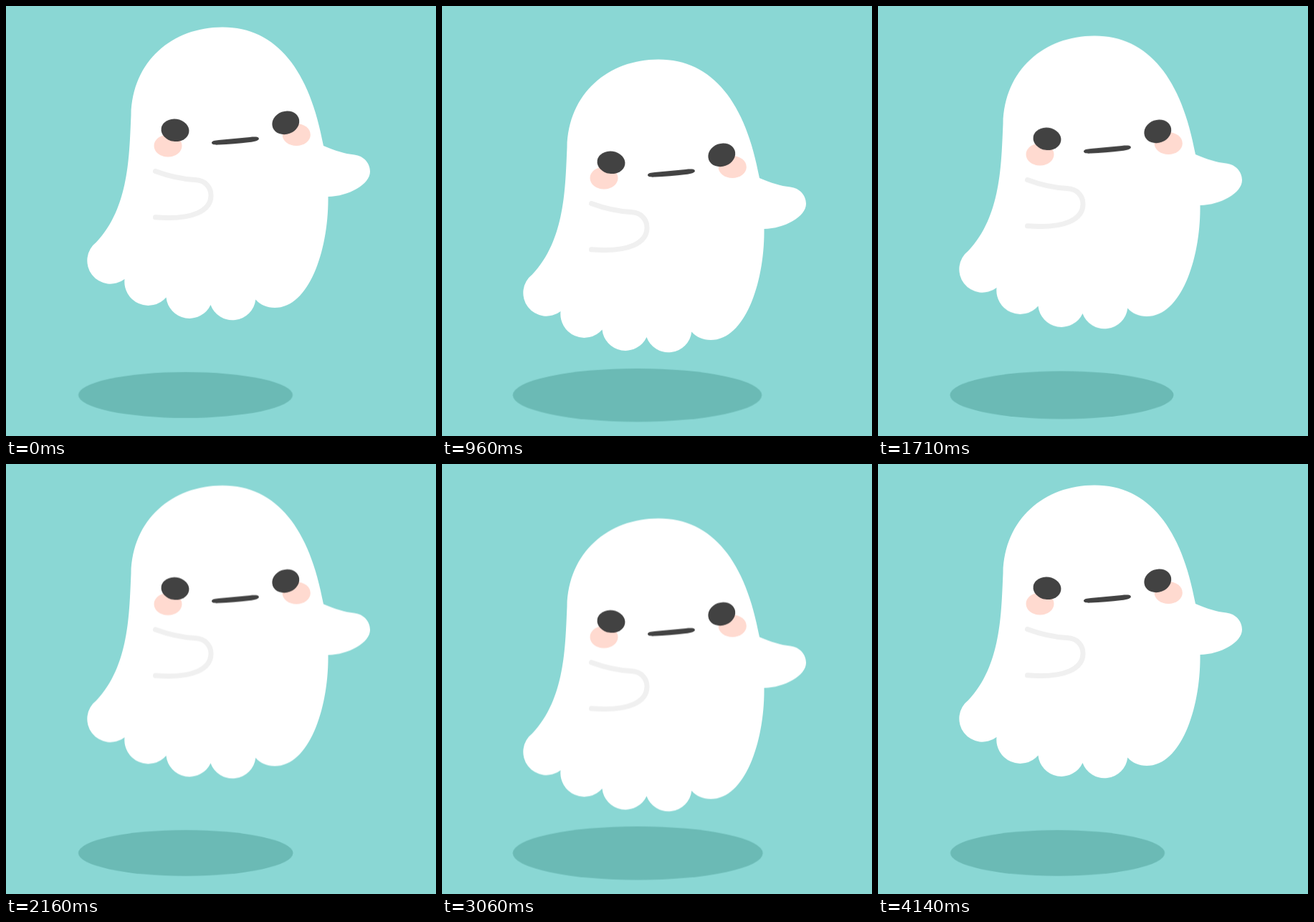
An HTML page without scripts for the animation above (4170 ms loop, 600 by 600 pixels).

```html
<!DOCTYPE html>
<html lang="en">
<head>
<meta charset="utf-8">
<title>Floating ghost</title>
<style>
  html, body { margin: 0; width: 100%; height: 100%; overflow: hidden; background: #8ad7d4; }
  svg { display: block; width: 100%; height: 100%; }

  .ghost, .shadow { animation: 4170ms linear infinite; }
  .ghost { animation-name: bob; }
  .shadow { animation-name: spread; fill: #6bbab5; }

  .body { fill: #fff; }
  .cheek { fill: #ffdad0; }
  .ink { fill: #424242; }
  .arm { fill: none; stroke: #f0f0f0; stroke-width: 7; stroke-linecap: round; }

  @keyframes bob {
    0% { transform: translateY(0); animation-timing-function: cubic-bezier(.43, 0, .62, 1); }
    26.02% { transform: translateY(46.5px); animation-timing-function: cubic-bezier(.5, 0, .5, 1); }
    49.88% { transform: translateY(0); animation-timing-function: cubic-bezier(.47, 0, .5, 1); }
    74.22% { transform: translateY(46.5px); animation-timing-function: cubic-bezier(.46, 0, .46, 1); }
    100% { transform: translateY(0); }
  }
  @keyframes spread {
    0% { transform: translate(250.5px, 542.8px); animation-timing-function: cubic-bezier(.43, 0, .62, 1); }
    26.02% { transform: translate(273.2px, 543px) scale(1.167); animation-timing-function: cubic-bezier(.5, 0, .5, 1); }
    49.88% { transform: translate(250.5px, 542.8px); animation-timing-function: cubic-bezier(.47, 0, .5, 1); }
    74.22% { transform: translate(273.2px, 543px) scale(1.167); animation-timing-function: cubic-bezier(.46, 0, .46, 1); }
    100% { transform: translate(250.5px, 542.8px); }
  }
</style>
</head>
<body>
<svg viewBox="0 0 600 600">
  <ellipse class="shadow" rx="149.5" ry="32"/>
  <g class="ghost">
    <path class="body" d="M302 29.5
      C378 29.5 424 90 443 195
      C460 202 472 206 486 207.5 C499 209 508 219 508 231
      C508 249 478 265.5 449.5 266
      C450.5 340 423 421 375 421 C364 421 355 417 348.3 409.5
      A32.5 32.5 0 0 1 285.5 417
      A32.6 32.6 0 0 1 223.5 406.5
      A33.2 33.2 0 0 1 165.5 381
      A32 32 0 0 1 126 329.5
      C172 281 172 208 174.5 152
      C176 77 232 29.5 302 29.5Z"/>
    <path class="arm" d="M208.5 230.5 C226 237 245 241.5 264 242.5 C278 243 286 253 286 264 C286 285 262 299 208.5 294.7"/>
    <ellipse class="cheek" cx="226" cy="195" rx="19.5" ry="15.5"/>
    <ellipse class="cheek" cx="405.2" cy="179.5" rx="19.6" ry="15.5"/>
    <ellipse class="ink" rx="19.5" ry="15.7" transform="translate(236 173.3) rotate(8)"/>
    <ellipse class="ink" rx="19.3" ry="16" transform="translate(390.3 162.8) rotate(-20)"/>
    <path class="ink" d="M287 190.8 C287 188.2 292 187.5 297 187 L340 183 C347 182.3 352.7 182.2 352.9 185 C353.1 187.7 347 189.2 340 190 C325 191.7 310 193.1 297 193.6 C291 193.9 287 193.4 287 190.8Z"/>
  </g>
</svg>
</body>
</html>
```
